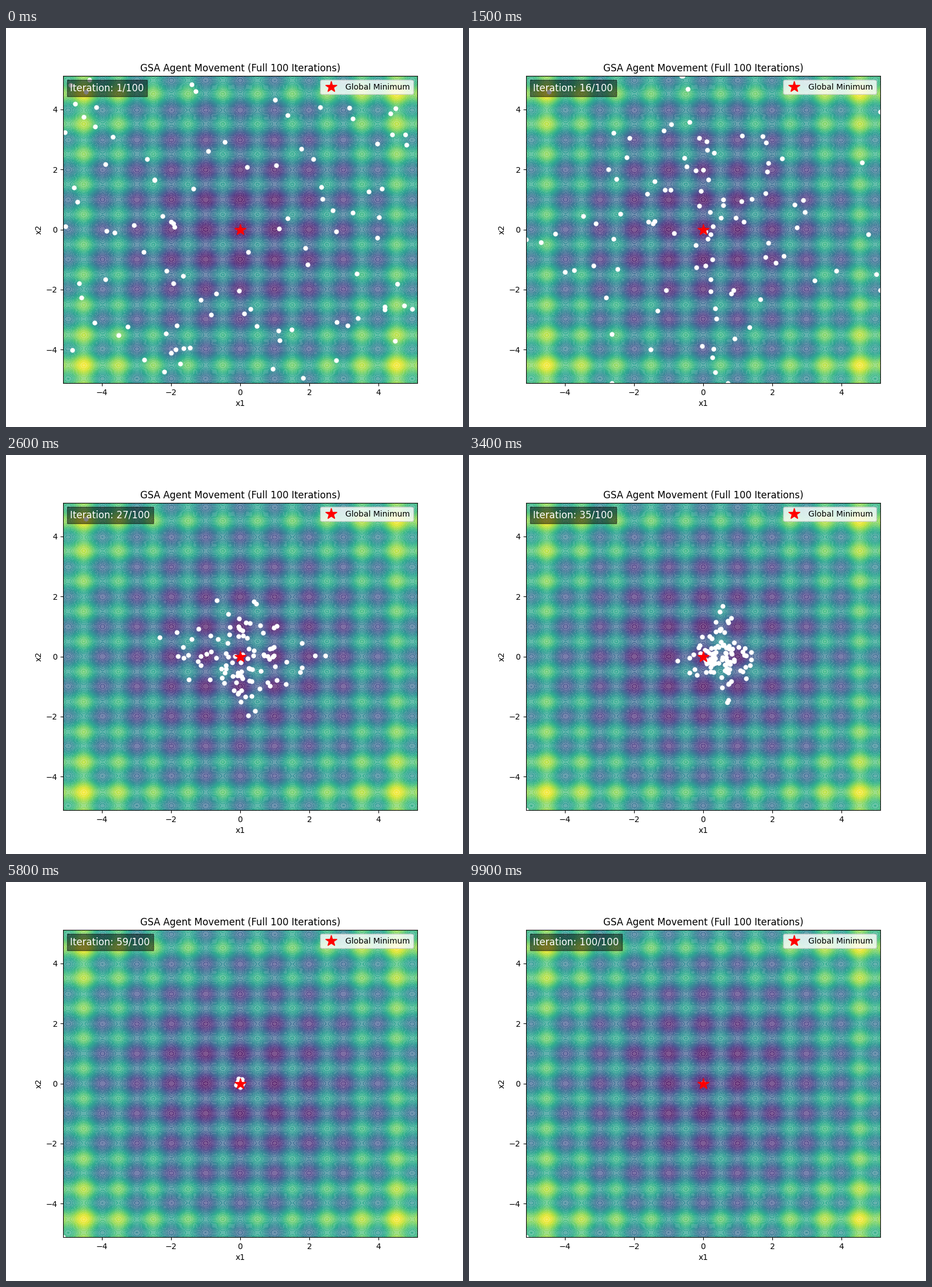
These frames come from a looping animation (800x700 px, 10 s). A matplotlib script:

```python
import numpy as np
import matplotlib.pyplot as plt
from matplotlib.animation import FuncAnimation

LIM = 5.12
N = 100
STEPS = 100
G0, DECAY, EPS = 100, 10, 1e-10
STRAND_STEP = 31


def rastrigin(x, y):
    return (20 + x**2 - 10 * np.cos(2 * np.pi * x)
            + y**2 - 10 * np.cos(2 * np.pi * y))


def simulate():
    """Gravitational search: the positions of all agents at every step."""
    np.random.seed(42)
    pos = np.random.uniform(-LIM, LIM, (N, 2))
    vel = np.zeros((N, 2))
    others = ~np.eye(N, dtype=bool)
    stray = []
    history = [pos.copy()]
    for t in range(STEPS - 1):
        fit = rastrigin(*pos.T)
        mass = (fit - fit.max()) / (fit.min() - fit.max())
        mass /= mass.sum()
        g = G0 * np.exp(-DECAY * t / STEPS)

        weight = np.zeros((N, N))
        weight[others] = np.random.rand(N * (N - 1))
        delta = pos[None] - pos[:, None]
        dist = np.hypot(delta[..., 0], delta[..., 1])
        pull = weight * g * np.outer(mass, mass) / (dist + EPS)
        force = (pull[..., None] * delta).sum(axis=1)

        vel = np.random.rand(N, 2) * vel + force / (mass[:, None] + EPS)
        pos = np.clip(pos + vel, -LIM, LIM)

        # the worst agent has no mass and stays behind in the corner
        if t == STRAND_STEP:
            stray = [fit.argmax()]
        pos[stray] = -LIM
        history.append(pos.copy())
    return history


def landscape(fig, ax):
    """Render the filled contours once and return them as an image."""
    grid = np.linspace(-LIM, LIM, 200)
    x, y = np.meshgrid(grid, grid)
    contours = ax.contourf(x, y, rastrigin(x, y), levels=50,
                           cmap="viridis", alpha=0.7)
    ax.set_axis_off()
    fig.canvas.draw()
    pixels = np.asarray(fig.canvas.buffer_rgba())
    height = pixels.shape[0]
    box = ax.bbox
    x0, x1 = round(box.x0), round(box.x1)
    y0, y1 = round(height - box.y1), round(height - box.y0)
    image = pixels[y0:y1, x0:x1].copy()
    contours.remove()
    ax.set_axis_on()
    return image


fig, ax = plt.subplots(figsize=(8, 7), dpi=100)
ax.set_xlim(-LIM, LIM)
ax.set_ylim(-LIM, LIM)
ax.imshow(landscape(fig, ax), extent=(-LIM, LIM, -LIM, LIM),
          aspect="auto", interpolation="nearest", zorder=0)

agents = ax.scatter([], [], c="white", s=25)
ax.plot(0, 0, "r*", markersize=15, label="Global Minimum")
counter = ax.text(0.02, 0.95, "", transform=ax.transAxes, fontsize=12,
                  color="white", bbox=dict(facecolor="black", alpha=0.5))
ax.set_title("GSA Agent Movement (Full 100 Iterations)")
ax.set_xlabel("x1")
ax.set_ylabel("x2")
ax.legend(loc="upper right")

history = simulate()


def update(i):
    agents.set_offsets(history[i])
    counter.set_text(f"Iteration: {i + 1}/{STEPS}")
    return agents, counter


anim = FuncAnimation(fig, update, frames=STEPS, interval=100, repeat=True,
                     repeat_delay=0)
plt.show()
```
